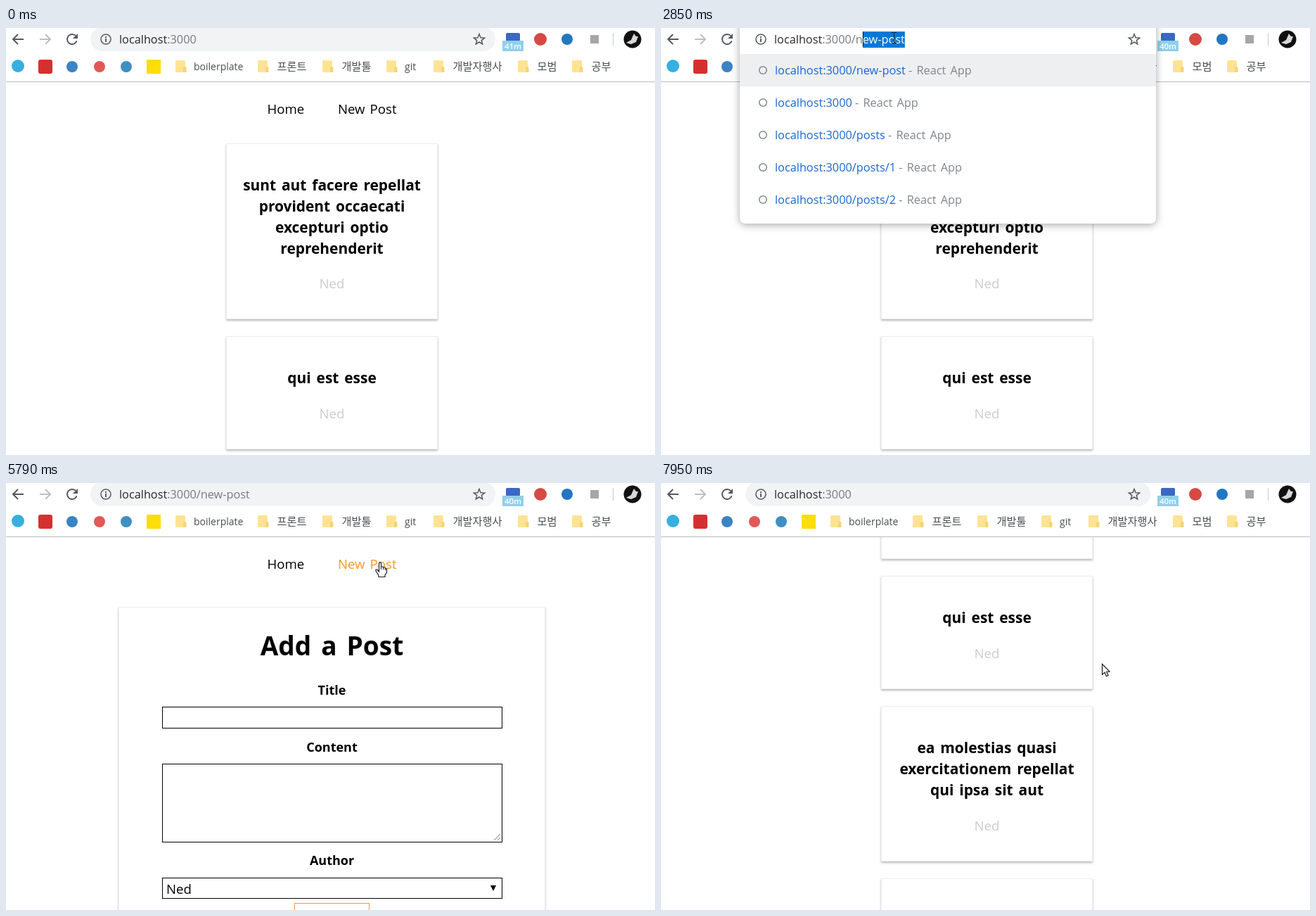
Recreate the animation shown at these times as an HTML page with a canvas. Size 923x607 px, loop 8 s.

```html
<!DOCTYPE html>
<html lang="ko">
<head>
<meta charset="utf-8">
<title>Blog routing</title>
<style>
html, body { margin: 0; width: 100%; height: 100%; overflow: hidden; background: #fff; }
canvas { display: block; }
</style>
</head>
<body>
<canvas id="stage" width="923" height="607"></canvas>
<script>
const ctx = document.getElementById('stage').getContext('2d');
const LOOP = 8000;
const AUTHOR = 'Ned';
const LATIN = '"Open Sans", "Noto Sans", sans-serif';
const HANGUL = '"Noto Sans CJK KR", "Noto Sans CJK", sans-serif';

const POSTS = [
  { y: 164, h: 250, lines: ['sunt aut facere repellat', 'provident occaecati', 'excepturi optio', 'reprehenderit'] },
  { y: 438, h: 161, lines: ['qui est esse'] },
  { y: 623, h: 221, lines: ['ea molestias quasi', 'exercitationem repellat', 'qui ipsa sit aut'] },
  { y: 868, h: 250, lines: ['eum et est occaecati'] }
];
const LINKS = [
  { label: 'Home', x: 371.5, w: 52 },
  { label: 'New Post', x: 472, w: 84 }
];
const FOLDERS = [
  [241, 'boilerplate'], [358, '프론트'], [450, '개발툴'], [541, 'git'],
  [608, '개발자행사'], [728, '모범'], [805, '공부']
];
const POINTER = [
  [70, 764, 423], [820, 420, 47], [970, 400, 46], [1050, 334, 22], [1130, 331, 14],
  [4390, 331, 14], [4700, 743, 248], [5010, 743, 248], [5160, 707, 232], [5200, 707, 232],
  [5480, 408, 108], [5580, 402, 107], [5790, 532, 112], [6319, 532, 112], [6320, 520, 105],
  [6490, 520, 105], [6560, 512, 120], [6760, 512, 120], [6880, 400, 114], [7000, 400, 114],
  [7260, 627, 257]
];
const FORM_SCROLL = [[4700, 0], [4850, 80], [5010, 35], [5160, 0]];
const HOME_SCROLL = [[7290, 0], [7500, 92], [7740, 215], [7940, 306]];

const within = (t, a, b) => t >= a && t < b;

function track(keys, t) {
  if (t <= keys[0][0]) return keys[0].slice(1);
  for (let i = 1; i < keys.length; i++) {
    const [t1, ...to] = keys[i], [t0, ...from] = keys[i - 1];
    if (t <= t1) return from.map((v, k) => v + (to[k] - v) * (t - t0) / (t1 - t0));
  }
  return keys[keys.length - 1].slice(1);
}

function text(s, x, y, size, { color = '#000', weight = 400, align = 'left', gap = 0.12, family = LATIN } = {}) {
  ctx.font = `${weight} ${size}px ${family}`;
  ctx.wordSpacing = `${size * gap}px`;
  ctx.textAlign = align;
  ctx.fillStyle = color;
  ctx.fillText(s, x, y);
  return ctx.measureText(s).width;
}

const heading = (s, y, size) => text(s, 463.5, y, size, { weight: 700, align: 'center' });

function rect(x, y, w, h, color) {
  ctx.fillStyle = color;
  ctx.fillRect(x, y, w, h);
}

function outline(x, y, w, h, color) {
  ctx.strokeStyle = color;
  ctx.lineWidth = 1;
  ctx.strokeRect(x + 0.5, y + 0.5, w - 1, h - 1);
}

function round(x, y, w, h, r, color) {
  ctx.fillStyle = color;
  ctx.beginPath();
  ctx.roundRect(x, y, w, h, r);
  ctx.fill();
}

function disc(x, y, r, color) {
  ctx.fillStyle = color;
  ctx.beginPath();
  ctx.arc(x, y, r, 0, 7);
  ctx.fill();
}

function path(points, { fill, stroke, width = 1, close = false }) {
  ctx.beginPath();
  points.forEach(([x, y]) => ctx.lineTo(x, y));
  if (close) ctx.closePath();
  if (fill) { ctx.fillStyle = fill; ctx.fill(); }
  if (stroke) { ctx.strokeStyle = stroke; ctx.lineWidth = width; ctx.stroke(); }
}

function shadowed(dy, blur, color, draw) {
  ctx.save();
  ctx.shadowOffsetY = dy;
  ctx.shadowBlur = blur;
  ctx.shadowColor = color;
  draw();
  ctx.restore();
}

function card(x, y, w, h, fill = '#fff') {
  shadowed(2, 3, '#bbb', () => rect(x, y, w, h, fill));
  outline(x, y, w, h, '#eee');
}

// Everything on screen that is not geometry follows from the time.
function stateAt(t) {
  const blank = within(t, 3780, 3860) || within(t, 6020, 6095) || within(t, 6650, 6720) || within(t, 7030, 7110);
  const form = within(t, 3860, 7030);
  const loading = within(t, 3460, 4010) || within(t, 5940, 6170) || within(t, 6490, 6800) || within(t, 6950, 7190);
  const [x, y] = track(POINTER, t);
  const scroll = track(form ? FORM_SCROLL : HOME_SCROLL, t)[0];
  const link = blank ? null : LINKS.find(l => x > l.x && x < l.x + l.w && y + scroll > 100 && y + scroll < 130);
  const post = blank || form ? null :
    POSTS.find(p => x > 313 && x < 614 && y > 77 && y + scroll > p.y && y + scroll < p.y + p.h);
  const typed = t < 2220 ? '' : t < 2770 ? '/' : t < 3000 ? '/n' : '/ne';
  return { t, blank, form, loading, x, y, scroll, link, post, typed };
}

function drawNav(s) {
  for (const l of LINKS)
    text(l.label, l.x, 122, 18.6, { color: l === s.link ? '#fa9a1e' : '#000' });
}

function drawPosts(s) {
  for (const p of POSTS) {
    card(313, p.y, 301, p.h, p === s.post ? '#eef7ff' : '#fff');
    p.lines.forEach((line, i) => heading(line, p.y + 66.5 + i * 30, 20.9));
    text(AUTHOR, 463.5, p.y + p.h - 44, 18.6, { color: '#ccc', align: 'center' });
  }
}

function drawForm() {
  card(160, 176, 607, 502);
  heading('Add a Post', 245, 37);
  heading('Title', 301, 18);
  outline(222, 318, 484, 31, '#000');
  heading('Content', 382, 18);
  outline(222, 399, 484, 112, '#000');
  path([[694, 508], [703, 499]], { stroke: '#777' });
  path([[699, 508], [703, 504]], { stroke: '#777' });
  heading('Author', 543, 18);
  outline(222, 561, 484, 30, '#000');
  text(AUTHOR, 228, 584, 18.6);
  path([[689, 572], [697, 572], [693, 580]], { fill: '#000', close: true });
  outline(410, 597, 107, 54, '#fa923f');
  text('Add Post', 463.5, 631, 18.6, { color: '#fa923f', align: 'center' });
}

function drawPage(s) {
  ctx.save();
  ctx.translate(0, -Math.round(s.scroll));
  drawNav(s);
  s.form ? drawForm() : drawPosts(s);
  ctx.restore();
}

function drawButtons(loading) {
  const arrow = (x, dir, color) => {
    path([[x, 16], [x + 15 * dir, 16]], { stroke: color, width: 2 });
    path([[x + 7 * dir, 9], [x, 16], [x + 7 * dir, 23]], { stroke: color, width: 2 });
  };
  arrow(10, 1, '#55585c');
  arrow(63, -1, '#bdbfc1');
  const ink = { stroke: '#55585c', width: 2 };
  if (loading) {
    path([[87, 9], [101, 23]], ink);
    path([[101, 9], [87, 23]], ink);
  } else {
    ctx.beginPath();
    ctx.arc(94, 16, 7, 0.35, 5.5);
    ctx.strokeStyle = ink.stroke;
    ctx.lineWidth = 2;
    ctx.stroke();
    path([[102, 8], [102, 15], [95, 15]], { fill: ink.stroke, close: true });
  }
}

function drawBookmarks(t) {
  if (within(t, 970, 1130)) round(350, 38, 86, 33, 16.5, '#eeeeee');
  disc(17, 54, 9, '#35b0e0');
  round(46, 45, 20, 20, 3, '#d5302f');
  disc(94, 55, 8, '#3a83c4');
  disc(133, 55, 8, '#df5a56');
  disc(171, 55, 8, '#3f8fc0');
  rect(200, 45, 20, 20, '#ffdd08');
  for (const [x, name] of FOLDERS) {
    round(x, 46, 14, 17, 1.5, '#ffe394');
    round(x + 11, 55, 4.5, 8, 1.5, '#f8d477');
    const latin = name < '가';
    text(name, x + (latin ? 26 : 27.5), latin ? 59.5 : 59.5, latin ? 14 : 15.2,
      { color: '#4a4d51', family: latin ? LATIN : HANGUL });
  }
}

function drawExtensions(t) {
  round(711, 7, 20, 12, 2, '#3a68c4');
  rect(706, 18, 30, 15, '#8fd0ec');
  text(t < 1990 ? '41m' : '40m', 721, 29.5, 11.5, { color: '#fff', weight: 600, align: 'center' });
  disc(760, 16, 9, '#d64a43');
  disc(798, 16, 8, '#2177c2');
  rect(831, 10, 12, 12, '#a6a6a6');
  rect(863, 7, 1, 18, '#c3cbd6');
  disc(891, 16, 12.5, '#101010');
  path([[882, 21], [889, 17], [893, 8], [896, 12], [899, 12], [896, 20], [889, 23]], { fill: '#d8d8d8', close: true });
}

function drawPopup(s) {
  const rows = ['/new-post', '', '/posts', '/posts/1', '/posts/2', '/about'];
  const count = s.typed === '/' ? 6 : 5;
  const bottom = 48 + count * 46 - (count - 5) * 8;
  shadowed(2, 12, 'rgba(0,0,0,.35)', () => round(112, -10, 592, bottom + 10, 8, '#fff'));
  rect(112, 37, 592, 46, '#eeeff0');
  for (let i = 0; i < count; i++) {
    const y = 60 + i * 46;
    disc(145, y, 6, '#80868b');
    disc(145, y, 4.5, i ? '#fff' : '#eeeff0');
    const w = text('localhost:3000' + rows[i], 162, y + 6, 16.3, { color: '#1967d2' });
    text(' - React App', 162 + w, y + 6, 16.3, { color: '#80868b' });
  }
}

function drawAddress(s) {
  const { t } = s;
  const focused = within(t, 1370, 3460);
  const popup = within(t, 2220, 3460);
  if (popup) {
    drawPopup(s);
  } else {
    round(120, -1, 576, 34, 17, focused ? '#fff' : '#f1f3f4');
    if (focused) {
      ctx.beginPath();
      ctx.roundRect(120.5, -0.5, 575, 33.5, 17);
      ctx.strokeStyle = '#a9c6f8';
      ctx.lineWidth = 2.5;
      ctx.stroke();
    }
  }

  ctx.beginPath();
  ctx.arc(142, 16, 7, 0, 7);
  ctx.strokeStyle = '#5a5d61';
  ctx.lineWidth = 1.6;
  ctx.stroke();
  rect(141, 15, 2, 5, '#5a5d61');
  rect(141, 12, 2, 2, '#5a5d61');

  const star = Array.from({ length: 10 }, (_, i) => {
    const r = i % 2 ? 3.5 : 8, a = i * Math.PI / 5 - Math.PI / 2;
    return [673 + r * Math.cos(a), 16.5 + r * Math.sin(a)];
  });
  path(star, { stroke: '#55585c', width: 1.5, close: true });

  const selected = within(t, 1370, 1990);
  const size = 16.3, base = 22;
  const dark = selected ? '#fff' : '#26282b', pale = selected ? '#fff' : '#777b80';
  if (selected) rect(162, 5, 109, 23, '#0078d7');
  let x = 161;
  x += text('localhost', x, base, size, { color: dark });
  const tail = popup ? s.typed : within(t, 3460, 7030) ? '/new-post' : '';
  x += text(':3000' + tail, x, base, size, { color: pale });
  if (popup && tail.length > 1) {
    const rest = '/new-post'.slice(tail.length);
    rect(x, 5, ctx.measureText(rest).width, 23, '#0078d7');
    text(rest, x, base, size, { color: '#fff' });
  }
  if (focused && !selected) rect(Math.round(x), 5, 1, 21, '#222');
}

function drawToolbar(s) {
  rect(0, 0, 923, 77, '#fff');
  rect(0, 76, 923, 1, '#bcbcbc');
  drawButtons(s.loading);
  drawBookmarks(s.t);
  drawExtensions(s.t);
  drawAddress(s);
}

function drawPointer(s) {
  if (s.t < 70) return;
  ctx.save();
  ctx.translate(Math.round(s.x), Math.round(s.y));
  const ink = { fill: '#fff', stroke: '#1a1a2a', width: 1.2, close: true };
  if (s.y < 33) {
    rect(0, -7, 1, 15, '#222');
    for (const y of [-8, 7]) {
      rect(-3, y, 3, 1, '#222');
      rect(1, y, 3, 1, '#222');
    }
  } else if (s.link || s.post) {
    path([[-1.5, 1.5], [0, 0.5], [1.5, 1.5], [1.5, 7], [4, 7], [4.5, 8], [7, 8], [7.5, 9.5], [9.5, 10],
      [9.5, 15], [7, 19], [7, 21.5], [-2, 21.5], [-2.5, 18.5], [-6, 13], [-6, 11], [-4, 11], [-1.5, 14]], ink);
    path([[1.5, 7], [1.5, 11]], { stroke: ink.stroke });
    path([[4.5, 8], [4.5, 11]], { stroke: ink.stroke });
    path([[7.3, 9], [7.3, 12]], { stroke: ink.stroke });
  } else {
    path([[0.5, 0.5], [0.5, 15.5], [4, 12.3], [6.3, 17.7], [9, 16.5], [6.7, 11.3], [11, 11]], ink);
  }
  ctx.restore();
}

function frame(now) {
  const s = stateAt(now % LOOP);
  rect(0, 0, 923, 607, '#fff');
  if (!s.blank) drawPage(s);
  drawToolbar(s);
  drawPointer(s);
  requestAnimationFrame(frame);
}
requestAnimationFrame(frame);
</script>
</body>
</html>
```
